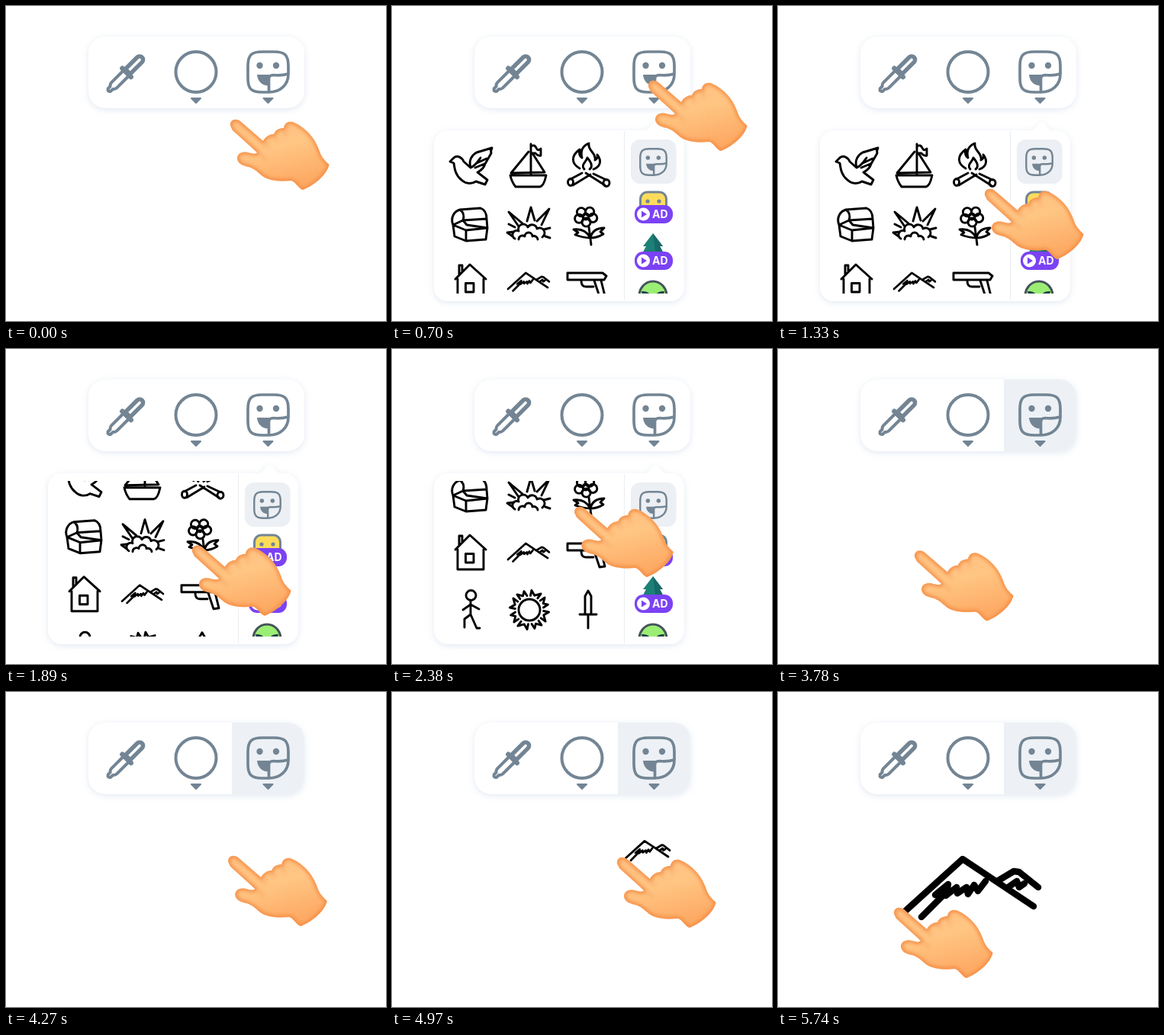
Write an HTML page that moves like this. It is 498 by 413 pixels and loops after 6.58 s.

```html
<!DOCTYPE html>
<html lang="en">
<head>
<meta charset="utf-8">
<title>Sticker picker</title>
<style>
  html, body { margin: 0; width: 100%; height: 100%; overflow: hidden; background: #fff; }
  svg { display: block; width: 100vw; height: 100vh; }
  .line { fill: none; stroke-linecap: round; stroke-linejoin: round; }
  .doodle { stroke: #000; stroke-width: 2.9; }
  .soft { filter: drop-shadow(0 2px 4px rgba(110, 145, 190, .2)); }
  text { font: 700 14px Inter, sans-serif; fill: #fff; }
</style>
</head>
<body>
<svg viewBox="0 0 498 413">
  <defs>
    <clipPath id="barClip"><rect x="108" y="40" width="283" height="94" rx="22"/></clipPath>
    <clipPath id="listClip"><rect x="60" y="173" width="320" height="204"/></clipPath>

    <!-- Peeling smiley, centred on the origin -->
    <g id="face">
      <path class="line" stroke="#738594" stroke-width="3.700" d="M1 26.500H-8C-22 26.500-26.500 22-26.500 8V-8C-26.500-22-22-26.500-8-26.500H8C22-26.500 26.500-22 26.500-8V2.500C26.500 17 16 26.500 1 26.500V9Q1 4 7 4Q18 5 26 2.500"/>
      <path fill="#738594" d="M-14.500 3.500H6Q1 5 1 18C-8 18-14 12-14.500 3.500Z"/>
      <circle cx="-11" cy="-8.500" r="4.200" fill="#738594"/>
      <circle cx="10.500" cy="-8.500" r="4.200" fill="#738594"/>
    </g>
    <path id="caret" fill="#738594" stroke="#738594" stroke-width="2" stroke-linejoin="round" d="M-6 0H6L0 6Z"/>
    <g id="badge">
      <rect width="50" height="24" rx="11" fill="#7b42f5"/>
      <circle cx="11.500" cy="12" r="8.500" fill="#fff"/>
      <path fill="#7b42f5" d="M9 7.500V16.500L16 12Z"/>
      <text x="23" y="17">AD</text>
    </g>
    <path id="mountain" class="line" stroke="#000" stroke-width="8.500" d="M0 0L75-68L117-40L168-6M122-40L142-52L149-51L174-31M136-32L146-39L149-31L156-36M21 8L49-20L39-21L56-35L53-20L67-31L68-23L80-31L82-22L90-34L95-26L105-39"/>
    <path id="handShape" d="M294 157C293 150 300 146 307 151L337 177C340 171 346 168 351 168C353 162 359 160 364 160C365 152 372 150 378 153C393 160 404 172 410 188C413 198 418 203 423.500 208C421 220 405 235 389 241C384 240 380 231 374 229C362 230 346 230 336 223C329 217 325 213 318 211C309 209 303 206 303 199C304 191 313 190 321 193C325 194 328 194 329 192L297 163Z"/>
    <clipPath id="handClip"><use href="#handShape"/></clipPath>
    <linearGradient id="skin" x1="0" y1="0" x2=".35" y2="1">
      <stop offset="0" stop-color="#ffc183"/>
      <stop offset=".5" stop-color="#ffc583"/>
      <stop offset="1" stop-color="#fdab65"/>
    </linearGradient>
    <filter id="blur"><feGaussianBlur stdDeviation="2.500"/></filter>
  </defs>

  <rect class="soft" x="108" y="40" width="283" height="94" rx="22" fill="#fff"/>
  <rect id="highlight" x="296" y="40" width="95" height="94" fill="#edf1f5" clip-path="url(#barClip)"/>
  <g class="line" stroke="#738594" transform="translate(156 89.500) rotate(45)">
    <path d="M-4.500-5V-27A4.500 4.500 0 0 1 4.500-27V-5Z" stroke-width="5.500"/>
    <path d="M-8-3H8" stroke-width="6.500"/>
    <path d="M-5 0V20Q-5 23-2.500 25V29Q0 33 2.500 29V25Q5 23 5 20V0" stroke-width="4"/>
  </g>
  <circle cx="249" cy="86.500" r="26.500" fill="none" stroke="#738594" stroke-width="4"/>
  <use href="#face" x="343.500" y="86.500"/>
  <use href="#caret" x="249" y="121"/>
  <use href="#caret" x="343.500" y="121"/>

  <g id="panel">
    <path class="soft" fill="#fff" d="M73 163H331C337 163 341 152 345.500 152S354 163 360 163H365A18 18 0 0 1 383 181V369A18 18 0 0 1 365 387H73A18 18 0 0 1 55 369V181A18 18 0 0 1 73 163Z"/>
    <path d="M304.500 164V386" stroke="#ebeff3"/>
    <g clip-path="url(#listClip)">
      <g id="list" class="line doodle">
        <!-- dove, boat, campfire -->
        <path d="M76 204L81 199C86 195 92 199 94 204L103 212C100 202 105 195 111 192L131 186Q129 190 130 193L126 200L122 207Q120 214 112 218L125 228L122 234L110 230C104 234 96 233 91 228C83 222 82 213 81 206ZM103 212C110 209 113 203 116 199M111 206L124 200M109 212L121 207"/>
        <path d="M155 222H202Q199 236 194 237H162Q157 231 155 222ZM182 181V222M182 184Q187 181 189 186T195 187V196Q191 197 188 193H182M179 191L156 219L200 218L184 193"/>
        <path d="M246 213C234 206 235 196 246 188Q244 196 249 199C246 188 251 183 258 180C256 190 268 192 266 202Q270 200 269 195C276 204 272 211 264 214M252 214C247 208 254 205 256 199C262 206 263 211 259 214M234 227L249 219M237 235L260 221M254 219L279 235M264 220L281 228"/>
        <ellipse cx="234" cy="231" rx="3.500" ry="4.500"/><ellipse cx="281" cy="232" rx="4" ry="4.500"/>
        <!-- chest, explosion, flower -->
        <path d="M80 287L97 294L125 291L123 306L97 308L82 302ZM97 294V308M80 287C76 277 82 269 89 267L116 265Q124 268 124 279L93 281ZM89 267Q96 272 93 281M93 281L98 287L125 291L124 279"/>
        <path d="M171 285L153 270L166 289M177 282L182 264L187 281M190 282L206 266L196 287M153 286L161 290M160 296L151 297L158 302M199 293L207 291M201 302L207 304M161 305A5.500 5.500 0 0 1 166 295A6.500 6.500 0 0 1 178 290A6.500 6.500 0 0 1 190 292A6 6 0 0 1 197 303M166 306A5 5 0 0 1 174 302A5 5 0 0 1 184 302A5 5 0 0 1 191 306"/>
        <g id="petals"></g>
        <path d="M258 290L261 313M260 304Q253 291 238 293L244 297L240 300Q251 304 260 304Q263 291 278 291L273 296L277 299Q269 304 260 304"/>
        <!-- house, mountain, pistol -->
        <path d="M86 358V384H120V358M83 358L102 339L123 358M88 352V340H92V348M96.500 363.500H107V375H96.500Z"/>
        <use href="#mountain" transform="translate(152 371) scale(.31)"/>
        <path d="M230 350H276L281 354L278 359H230ZM265 360L272 381L279 380L274 360M248 360Q248 368 254 368H264"/>
        <!-- figure, sun, sword -->
        <circle cx="103.500" cy="418" r="6.500"/>
        <path d="M103 425V443L95 449V460M103 443L111 461H115M93 437L103 430L114 436"/>
        <circle cx="180" cy="437" r="14"/>
        <g id="rays"></g>
        <path d="M253 443V419L257 412L261 419V443M246 443H268M257 443V461"/>
      </g>
      <rect x="313" y="175" width="59.500" height="58" rx="12" fill="#eceff3"/>
      <use href="#face" transform="translate(342.500 204.500) scale(.65)"/>
      <rect x="325.500" y="244" width="34" height="34" rx="9" fill="#fddc5c" stroke="#738594" stroke-width="3"/>
      <circle cx="335" cy="256" r="2.600" fill="#738594"/><circle cx="350" cy="256" r="2.600" fill="#738594"/>
      <use href="#badge" x="318" y="261"/>
      <path fill="#1d8076" d="M342 298L355 315H351L359 330H325L333 315H329Z"/>
      <path fill="#176a68" d="M342 298L355 315H351L359 330H346Z"/>
      <use href="#badge" x="318" y="322"/>
      <ellipse cx="342" cy="380" rx="18" ry="19" fill="#9bee74" stroke="#45535c" stroke-width="3"/>
      <path fill="#25424a" d="M327 374Q336 373 339 380L329 382ZM357 374Q348 373 345 380L355 382Z"/>
    </g>
  </g>

  <use id="drawing" href="#mountain"/>

  <g id="hand">
    <use href="#handShape" fill="url(#skin)"/>
    <g clip-path="url(#handClip)">
      <use href="#handShape" fill="none" stroke="#f48a43" stroke-width="5" filter="url(#blur)"/>
      <path class="line" stroke="#ee914f" stroke-width="2" opacity=".6" filter="url(#blur)" d="M337 177L343 186M351 168L354 176M364 160L367 170M326 193Q335 193 340 201"/>
    </g>
  </g>
</svg>
<script>
const LOOP = 6580, STEP = 70;
const el = id => document.getElementById(id);
const repeat = (count, make) => Array.from({ length: count }, (_, i) => make(i)).join('');

el('petals').innerHTML = '<circle cx="254" cy="276" r="4"/>' + repeat(5, i => {
  const a = i * Math.PI * 2 / 5 - 1;
  return `<circle cx="${254 + 9.5 * Math.cos(a)}" cy="${276 + 7.5 * Math.sin(a)}" r="5.6"/>`;
});
el('rays').innerHTML = repeat(8, i =>
  `<path d="M-5-18L-6-25L0-20L${i % 2 ? 4 : 7}-25L5-18" transform="translate(180 437) rotate(${i * 45 + 20})"/>`);

const linear = p => p;
const smooth = p => (1 - Math.cos(Math.PI * p)) / 2;
const progress = (t, from, to) => Math.min(1, Math.max(0, (t - from) / (to - from)));
const mix = (a, b, p) => a + (b - a) * p;

// [time, x, y, easing of the move that ends here]
const handPath = [
  [0, 0, 0], [430, 42, -51], [770, 42, -51], [1330, -23, 91], [1610, -50, 149],
  [2270, -50, 54], [2940, -123, 116, smooth], [3010, -123, 119], [3745, -123, 119],
  [4330, 11, 60], [4600, 11, 60], [4970, 1, 68], [5740, -142, 134, smooth], [LOOP, -142, 134]
];

function handAt(t) {
  const next = handPath.findIndex(key => key[0] > t);
  const [t0, x0, y0] = handPath[next - 1];
  const [t1, x1, y1, ease = linear] = handPath[next];
  const p = ease(progress(t, t0, t1));
  return [mix(x0, x1, p), mix(y0, y1, p)];
}

const show = (id, visible) => el(id).setAttribute('visibility', visible ? 'visible' : 'hidden');
const transform = (id, value) => el(id).setAttribute('transform', value);

function draw(t) {
  const [x, y] = handAt(t);
  transform('hand', `translate(${x} ${y})`);
  transform('list', `translate(0 ${-95 * progress(t, 1610, 2270)})`);
  show('highlight', (t >= 490 && t < 700) || t >= 3570);
  show('panel', t >= 490 && t < 3640);

  const grow = smooth(progress(t, 4970, 5740));
  const scale = mix(.2, 1 / 3, progress(t, 4600, 4970)) + grow * 2 / 3;
  show('drawing', t >= 4600);
  transform('drawing', `translate(${305 + 4 * grow + x} ${150 + 3 * grow + y}) scale(${scale})`);
}

const start = performance.now();
function tick() {
  const t = (performance.now() - start) % LOOP;
  draw(Math.floor(t / STEP) * STEP);
  requestAnimationFrame(tick);
}
tick();
</script>
</body>
</html>
```
